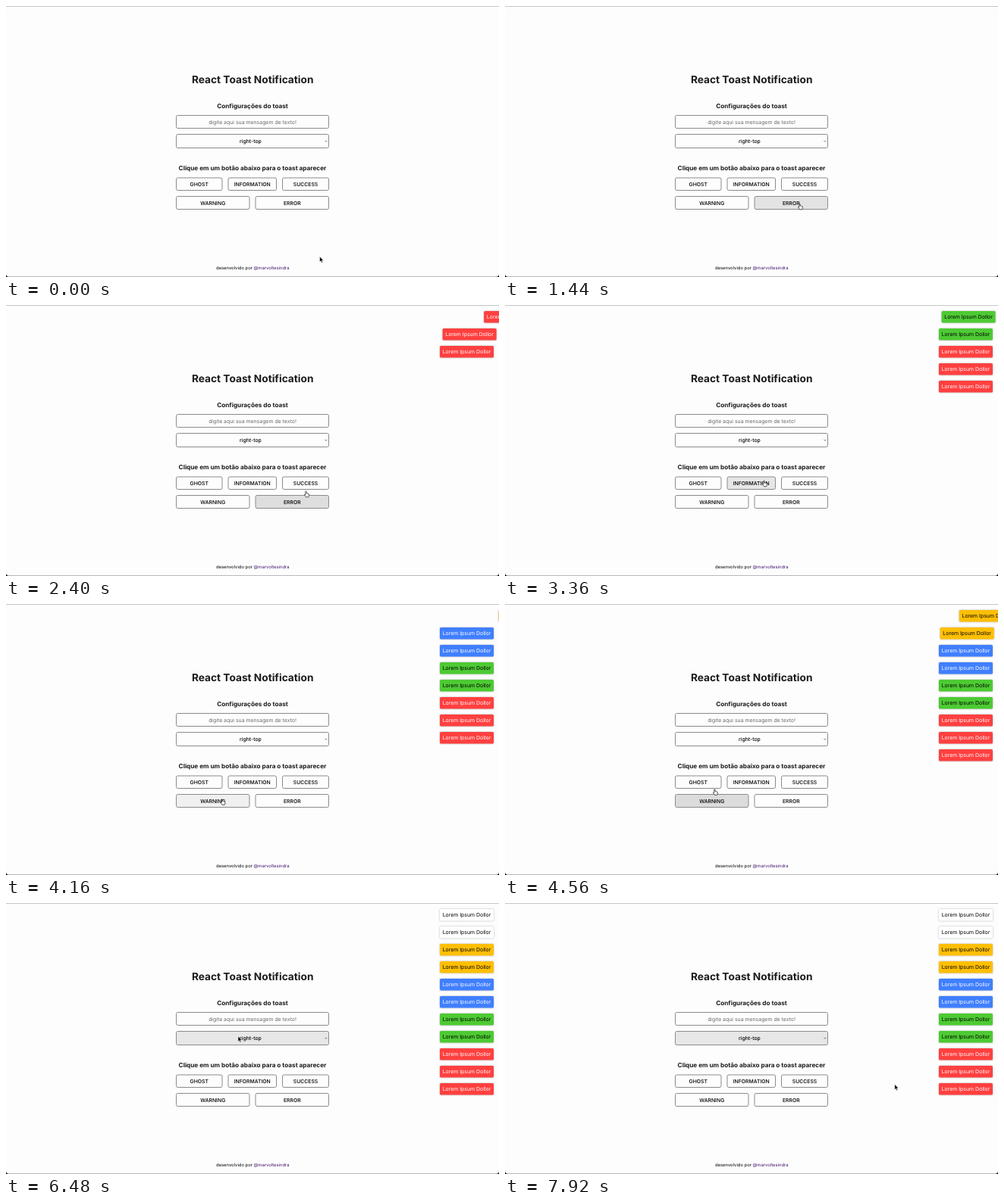
An HTML page for the animation above (8 s loop, 650 by 358 pixels).

```html
<!DOCTYPE html>
<html lang="pt-BR">
<head>
<meta charset="utf-8">
<title>React Toast Notification</title>
<style>
  html, body { margin: 0; width: 100%; height: 100%; overflow: hidden; background: #000; }
  svg { display: block; width: 650px; height: 358px; }
  text { font: 6.92px Inter, "Open Sans", sans-serif; text-anchor: middle; text-rendering: geometricPrecision; }
  .title { font-size: 13.7px; font-weight: 700; fill: #1c1c1e; }
  .head { font-size: 8.2px; font-weight: 700; fill: #1c1c1e; }
  .foot { font-size: 5.88px; text-anchor: start; }
  .field { stroke: #8b8b8b; }
  .label { font-size: 6.85px; font-weight: 500; }
  .toast rect { filter: drop-shadow(0 .8px 1.2px rgba(0, 0, 0, .3)); }
</style>
</head>
<body>
<svg id="stage" viewBox="0 0 650 358">
  <rect y="-5" width="650" height="363" rx="4" fill="#b9b9b9"/>
  <rect y="-5" width="650" height="362" rx="4" fill="#fdfdfd"/>
  <rect width="650" height="1" fill="#c6c6c6"/>
  <text class="title" x="325.2" y="102.2">React Toast Notification</text>
  <text class="head" x="325" y="135.3">Configurações do toast</text>
  <text class="head" x="325" y="217.4">Clique em um botão abaixo para o toast aparecer</text>
  <g id="fields"></g>
  <path d="M420.4 177.8l1.5 1.5 1.5-1.5" fill="none" stroke="#444" stroke-width=".7"/>
  <text class="foot" x="277" y="348.2">desenvolvido por <tspan fill="#451673">@marvoltesindra</tspan></text>
  <g id="toasts"></g>
  <g id="cursor" stroke-linejoin="round">
    <path id="arrow" d="M0 0V7.1L1.6 5.7 2.7 8.2 3.9 7.7 2.8 5.2H5Z" fill="#000" stroke="#fff" stroke-width=".5"/>
    <path id="hand" d="M-.6 .5Q0-.4 .6 .5V3Q1.3 2.5 1.8 3.2 2.5 2.8 2.9 3.5 3.8 3.3 3.9 4.2V5.5Q3.8 6.6 3.1 7.8H0Q-.6 6.6-2 4.9-2 3.8-.6 4.7Z" fill="#fff" stroke="#111" stroke-width=".7"/>
  </g>
</svg>
<script>
const LOOP = 8000, SLIDE = 500, FADE = 200;
const $ = id => document.getElementById(id);
const clamp = v => Math.min(1, Math.max(0, v));

function add(parent, tag, attrs, label) {
  const el = document.createElementNS('http://www.w3.org/2000/svg', tag);
  for (const key in attrs) el.setAttribute(key, attrs[key]);
  if (label) el.textContent = label;
  return parent.appendChild(el);
}

// label, left, top, width, height, hover start, hover end, hover depth
const fields = [
  ['digite aqui sua mensagem de texto!', 224.5, 144.5, 201, 17],
  ['right-top', 224.5, 169.5, 201, 18, 5050, 9000, 22],
  ['GHOST', 224.5, 227, 60.5, 16.5, 4600, 5020, 33],
  ['INFORMATION', 293, 227, 63.5, 16.5, 3220, 3860, 33],
  ['SUCCESS', 364.5, 227, 61, 16.5, 2440, 3130, 33],
  ['WARNING', 224.5, 251.5, 96.5, 17, 4085, 4560, 33],
  ['ERROR', 329, 251.5, 96.5, 17, 1285, 2390, 33]
].map(([label, x, y, width, height, on, off, depth], i) => {
  const box = add($('fields'), 'rect', { class: 'field', x, y, width, height, rx: 2, fill: '#fdfdfd' });
  const cx = i == 1 ? 322.4 : x + width / 2;
  add($('fields'), 'text', { class: i ? 'label' : '', x: cx, y: y + 11.4, fill: i ? '#000' : '#6a6a6a' }, label);
  return { box, on, off, depth };
});

// start time, background, text colour
const red = ['#ff4040', '#fff'], green = ['#4dca33', '#000'], blue = ['#407fff', '#fff'],
  amber = ['#ffbf05', '#000'], ghost = ['#fff', '#000'];
const toasts = [
  [1760, red], [2035, red], [2310, red], [2780, green], [2995, green], [3460, blue],
  [3650, blue], [4155, amber], [4370, amber], [4820, ghost], [4970, ghost]
].map(([start, [fill, ink]]) => {
  const g = add($('toasts'), 'g', { class: 'toast' });
  add(g, 'rect', { width: 71, height: 15.4, rx: 1.5, fill });
  add(g, 'text', { x: 35.5, y: 10.2, fill: ink }, 'Lorem Ipsum Dollor');
  return { g, start };
});

// time, x, y of the pointer tip
const path = [
  [0, 413.6, 331], [1040, 413.6, 331], [1280, 393, 276], [1440, 388.5, 261], [2320, 389, 261],
  [2400, 395.5, 246], [2560, 395, 233], [3020, 394, 233], [3360, 341.5, 232], [3780, 339, 233],
  [4160, 285, 257.5], [4420, 284, 257], [4680, 270, 234], [4970, 270, 234], [5040, 297, 182],
  [5280, 306, 176], [7280, 306, 176], [7840, 513.8, 239.5], [8000, 513.8, 239.5]
];

// cubic-bezier(.25, .1, .25, 1)
function ease(p) {
  let lo = 0, hi = 1, s = p;
  for (let i = 0; i < 20; i++) {
    s = (lo + hi) / 2;
    if (.75 * s * (1 - s) + s ** 3 < p) lo = s; else hi = s;
  }
  return .3 * s * (1 - s) ** 2 + 3 * s * s * (1 - s) + s ** 3;
}

function pointer(t) {
  const i = path.findIndex(k => k[0] > t);
  const [t0, x0, y0] = path[i - 1], [t1, x1, y1] = path[i];
  const p = (t - t0) / (t1 - t0);
  return [x0 + (x1 - x0) * p, y0 + (y1 - y0) * p];
}

function draw(t) {
  for (const { box, on, off, depth } of fields) {
    if (!on) continue;
    const level = clamp((t - on) / FADE) - clamp((t - off) / FADE);
    const grey = Math.round(253 - depth * level);
    box.setAttribute('fill', `rgb(${grey},${grey},${grey})`);
  }
  const shown = toasts.filter(o => o.start <= t).length;
  toasts.forEach(({ g, start }, i) => {
    g.style.display = i < shown ? '' : 'none';
    const x = 650 - 78 * ease(clamp((t - start) / SLIDE));
    g.setAttribute('transform', `translate(${x} ${8.1 + 23 * (shown - 1 - i)})`);
  });
  const overButtons = t > 1290 && t < 5000;
  $('hand').style.display = overButtons ? '' : 'none';
  $('arrow').style.display = overButtons ? 'none' : '';
  $('cursor').setAttribute('transform', `translate(${pointer(t).join(' ')})`);
}

const begin = performance.now();
function tick() {
  draw((performance.now() - begin) % LOOP);
  requestAnimationFrame(tick);
}
tick();
</script>
</body>
</html>
```
